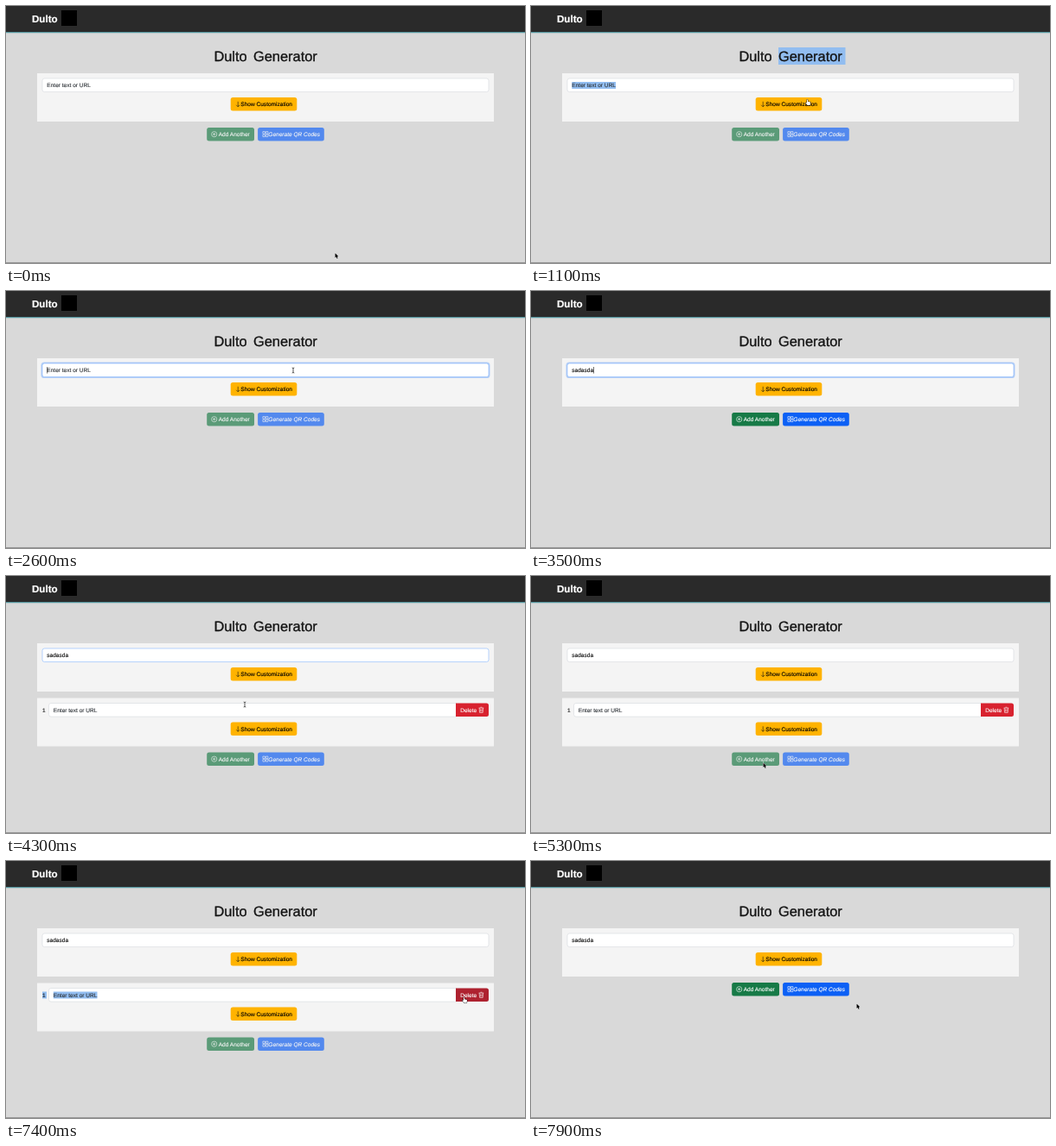
Animation, 600 px wide and 298 px high, one loop 8000 ms. Source, as an HTML page with a canvas:

```html
<!DOCTYPE html>
<html lang="en">
<head>
<meta charset="utf-8">
<title>Dulto Generator</title>
<style>
  html, body { margin: 0; width: 100%; height: 100%; overflow: hidden; background: #d9d9d9; }
  canvas { display: block; width: 600px; height: 298px; }
</style>
</head>
<body>
<canvas id="stage"></canvas>
<script>
const W = 600, H = 298, LOOP = 8000, STEP = 100;
const FONT = '"Liberation Sans", Arial, sans-serif';
const BODY = 6.56, TITLE = 16.4, ROW = 63.5, CTRL = 15.6, RADIUS = 2.5;
const INK = '#141414', SELECT = '#92bdf0';
const TYPED = 'sadasda', GLIDE = 400;

const canvas = document.getElementById('stage');
const ctx = canvas.getContext('2d');
const dpr = window.devicePixelRatio || 1;
canvas.width = W * dpr;
canvas.height = H * dpr;

const clamp = (v, lo, hi) => Math.max(lo, Math.min(hi, v));
const ease = k => k * k * (3 - 2 * k);

// Controls: left, top, width
const input = { x: 42, y: 84, w: 516 };
const show = { x: 259.7, y: 106, w: 76.6 };
const add = { x: 232.2, y: 141, w: 54.8 };
const generate = { x: 291.1, y: 141, w: 76.7 };
const extraInput = { x: 49.5, y: 84 + ROW, w: 471 };
const remove = { x: 520, y: 84 + ROW, w: 38 };
const lower = c => ({ ...c, y: c.y + ROW });
const hit = (c, x, y) => x >= c.x && x <= c.x + c.w && y >= c.y && y <= c.y + CTRL;

// Pointer stops: arrival time, x, y
const stops = [
  [0, 380, 286], [300, 364, 159], [900, 286, 59], [1300, 352, 158],
  [1800, 304, 150.5], [2600, 332, 92], [3100, 333, 145], [4000, 276, 149],
  [4800, 268, 216], [5700, 300, 126], [6200, 266, 215.5], [7000, 522, 155],
  [7400, 529, 158], [7900, 376, 165]
];

function pointerAt(t) {
  const i = stops.findIndex(s => s[0] >= t);
  if (i <= 0) return stops.at(i).slice(1);
  const [t0, x0, y0] = stops[i - 1], [t1, x1, y1] = stops[i];
  const from = Math.max(t0, t1 - GLIDE);
  const k = ease(clamp((t - from) / (t1 - from), 0, 1));
  return [x0 + (x1 - x0) * k, y0 + (y1 - y0) * k];
}

function rect(x, y, w, h, fill) {
  ctx.fillStyle = fill;
  ctx.fillRect(x, y, w, h);
}

function box({ x, y, w }, fill, radius = RADIUS) {
  ctx.beginPath();
  ctx.roundRect(x, y, w, CTRL, radius);
  ctx.fillStyle = fill;
  ctx.fill();
}

function outline(color, width) {
  ctx.strokeStyle = color;
  ctx.lineWidth = width;
  ctx.stroke();
}

function text(s, x, y, color = INK, size = BODY, style = '') {
  ctx.font = `${style} ${size}px ${FONT}`;
  ctx.fillStyle = color;
  ctx.fillText(s, x, y);
  // A hairline gives the slightly heavier desktop rendering
  ctx.strokeStyle = color;
  ctx.lineWidth = size * 0.02;
  ctx.strokeText(s, x, y);
}

function label(s, c, dx, color, style) {
  text(s, c.x + dx, c.y + 10.1, color, BODY, style);
}

// Icon strokes in local coordinates, as SVG path data
function icon(d, x, y, stroke, width = 0.6, fill) {
  const path = new Path2D(d);
  ctx.save();
  ctx.translate(x, y);
  ctx.lineJoin = 'round';
  ctx.strokeStyle = stroke;
  ctx.lineWidth = width;
  ctx.stroke(path);
  if (fill) {
    ctx.fillStyle = fill;
    ctx.fill(path);
  }
  ctx.restore();
}

function drawHeader() {
  rect(0, 0, W, 30.3, '#2a2a2a');
  rect(0, 30.3, W, 0.9, '#35919c');
  text('Dulto', 30, 18.6, '#fff', 11.6, 'bold');
  rect(64, 5, 18, 18, '#000');
}

function drawTitle(selected) {
  if (selected) rect(286, 48, 77.5, 20, SELECT);
  text('Dulto', 240.4, 64, INK, TITLE);
  text('Generator', 286, 64, INK, TITLE);
}

function drawInput(c, value, selected, focus, radius = RADIUS) {
  ctx.beginPath();
  if (focus === 'ring') {
    ctx.roundRect(c.x - 1.5, c.y - 1.5, c.w + 3, CTRL + 3, RADIUS + 1.2);
    ctx.fillStyle = '#b3cdf5';
    ctx.fill();
  }
  box(c, '#fff', radius);
  outline(focus ? '#86b7fe' : '#d5d9dd', 0.6);
  if (selected) rect(c.x + 5.3, c.y + 4, 50.7, 8, SELECT);
  label(value || 'Enter text or URL', c, 5.3, value ? INK : '#30353a');
  if (focus === 'ring') rect(c.x + 5.5 + ctx.measureText(value).width, c.y + 4, 0.6, 7.6, INK);
}

function drawShow(c) {
  box(c, '#ffb300');
  icon('M0-3V3M-2 1L0 3L2 1', c.x + 8.5, c.y + 7.8, INK);
  label('Show Customization', c, 11.6, '#000');
}

function drawRemove(hover) {
  box(remove, hover ? '#ae2230' : '#d8222f', [0, RADIUS, RADIUS, 0]);
  label('Delete', remove, 5.2, '#fff');
  icon('M-2.8-2.3H2.8M-.9-3.1H.9M-2.2-2.3L-1.8 3.1H1.8L2.2-2.3M-.7-1V2M.7-1V2',
    remove.x + 29.4, remove.y + 7.8, '#fff');
}

function drawActions(addBox, genBox, enabled) {
  const ink = enabled ? '#fff' : '#f4f4f4';
  box(addBox, enabled ? '#177a47' : '#5b9b78');
  icon('M-3.1 0A3.1 3.1 0 1 1 3.1 0A3.1 3.1 0 1 1-3.1 0M-1.7 0H1.7M0-1.7V1.7',
    addBox.x + 8.5, addBox.y + 7.7, ink);
  label('Add Another', addBox, 13.5, ink);

  box(genBox, enabled ? '#0c60f5' : '#5389ee');
  for (let i = 0; i < 4; i++) {
    icon('M0 0H2.5V2.5H0Z', genBox.x + 5.8 + (i % 2) * 3.5, genBox.y + 4.6 + (i >> 1) * 3.5, ink);
  }
  label('Generate QR Codes', genBox, 12.2, ink, 'italic');
}

function drawPointer(x, y, s) {
  const [addBox, genBox] = s.actions;
  const fields = s.second ? [input, extraInput] : [input];
  const buttons = [show];
  if (s.second) buttons.push(lower(show), remove);
  if (s.enabled) buttons.push(addBox, genBox);
  const over = list => list.some(c => hit(c, x, y));

  if (over(fields)) {
    const beam = 'M-1.3-3L0-2.5L1.3-3M0-2.5V2.5M-1.3 3L0 2.5L1.3 3';
    icon(beam, x, y, '#fff', 1.4);
    icon(beam, x, y, '#222', 0.75);
  } else if (over(buttons)) {
    icon('M0 0H.9L1 2.3L4 3L3.6 6.6H.6L-1.6 3.7L-.8 3.3L0 4Z', x, y, '#000', 0.8, '#fff');
  } else {
    icon('M0 0V5.6L1.3 4.5L2.2 6.4L3.1 6L2.3 4.1L4 4Z', x + 0.5, y + 0.5, '#fff', 0.9, '#000');
  }
}

function stateAt(t) {
  const between = (a, b) => t >= a && t < b;
  const second = between(4200, 7600);
  const letters = clamp(Math.floor((t - 2600) / 100), 0, TYPED.length);
  return {
    second,
    actions: second ? [lower(add), lower(generate)] : [add, generate],
    value: TYPED.slice(0, letters),
    enabled: letters > 0 && !second,
    titleSelected: between(1000, 2600),
    firstSelected: between(1100, 2600),
    secondSelected: between(5900, 7600),
    focus: between(2600, 4200) ? 'ring' : between(4200, 4400) ? 'fade' : '',
    removeHover: between(7000, 7600),
    pointer: !between(3200, 3600)
  };
}

function draw(t) {
  const s = stateAt(t);
  ctx.setTransform(dpr, 0, 0, dpr, 0, 0);
  ctx.textRendering = 'geometricPrecision';
  rect(0, 0, W, H, '#d9d9d9');
  rect(0, 297, W, 1, '#999');
  drawHeader();
  drawTitle(s.titleSelected);

  rect(36, 78, 528, 56, '#f4f4f4');
  drawInput(input, s.value, s.firstSelected, s.focus);
  drawShow(show);

  if (s.second) {
    rect(36, 78 + ROW, 528, 56, '#f4f4f4');
    if (s.secondSelected) rect(42, 151.5, 5, 8, SELECT);
    text('1', 42, 157.6);
    drawInput(extraInput, '', s.secondSelected, '', [RADIUS, 0, 0, RADIUS]);
    drawRemove(s.removeHover);
    drawShow(lower(show));
  }
  drawActions(...s.actions, s.enabled);
  if (s.pointer) drawPointer(...pointerAt(t), s);
}

const start = performance.now();
function tick() {
  const t = (performance.now() - start) % LOOP;
  draw(Math.floor(t / STEP) * STEP);
  requestAnimationFrame(tick);
}
tick();
</script>
</body>
</html>
```
